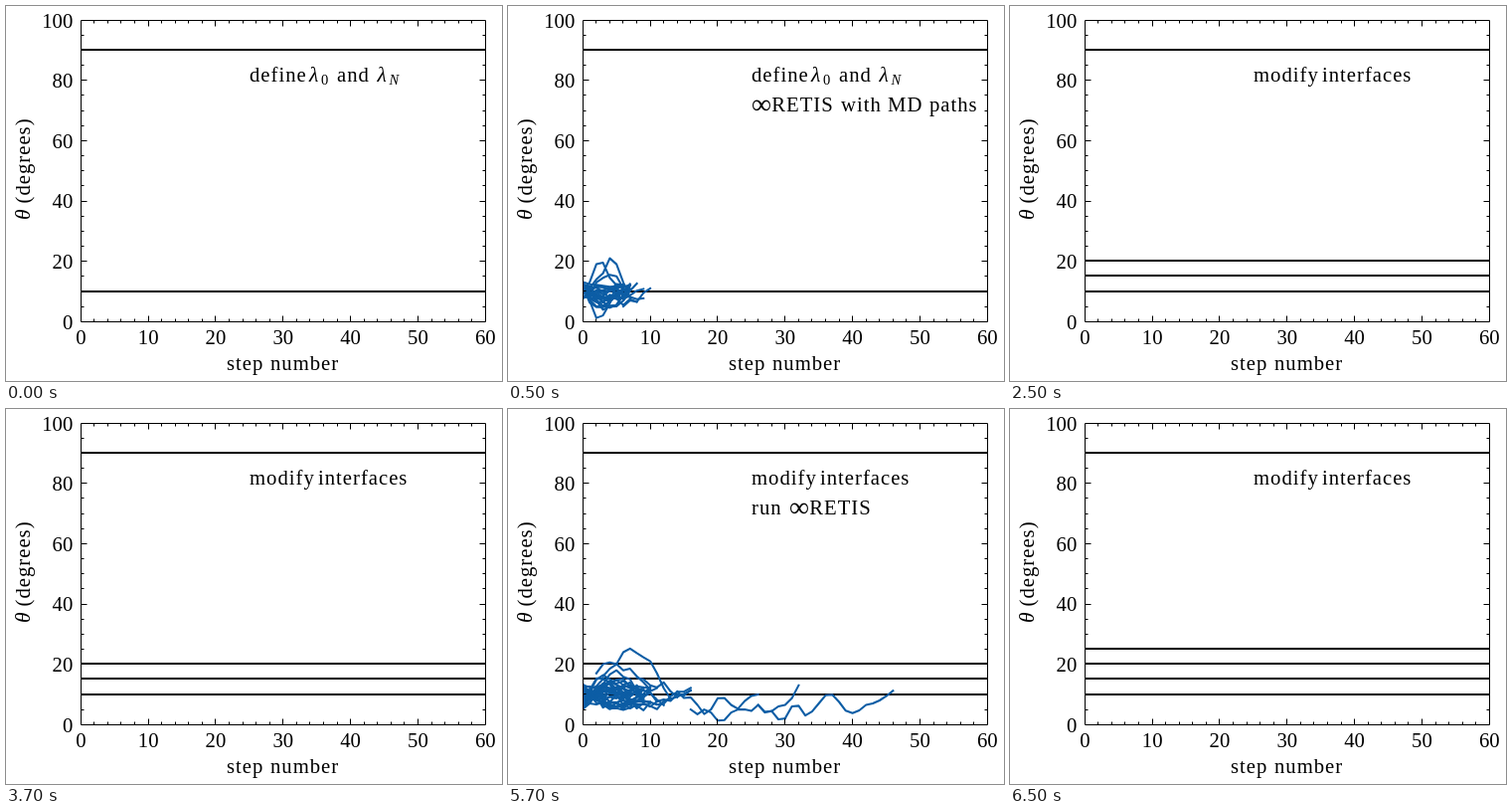
These frames come from a looping animation (499 by 377 pixels, 8000 ms). An HTML page:

```html
<!DOCTYPE html>
<html lang="en">
<head>
<meta charset="utf-8">
<title>Interface placement</title>
<style>
  html, body { margin: 0; width: 100%; height: 100%; overflow: hidden; background: #fff; }
  svg { display: block; width: 100%; height: 100%; }
  text { font: 20.7px "Liberation Serif", "Times New Roman", serif; fill: #000; }
  .word { letter-spacing: 1px; }
  .greek { font-style: italic; font-size: 21.5px; }
  .inf { font-size: 28px; }
  .sub { font-size: 14.5px; }
  .subItalic { font-size: 14.5px; font-style: italic; }
  .mid { text-anchor: middle; }
  .end { text-anchor: end; }
  .frame { fill: none; stroke: #000; stroke-width: 1; }
  .level { stroke: #000; stroke-width: 2; }
  .path { fill: none; stroke: #0c5da5; stroke-width: 2.08; stroke-linejoin: round; stroke-linecap: square; }
</style>
</head>
<body>
<svg viewBox="0 0 499 377">
  <defs><clipPath id="plot"><rect x="75" y="14" width="408" height="304"/></clipPath></defs>
  <g id="scenes"></g>
  <g id="axes"></g>
</svg>
<script>
const LOOP = 8000;
const px = step => 75.3 + step * 6.783;
const py = deg => 317.2 - deg * 3.03;

function add(parent, tag, attrs, text) {
  const node = document.createElementNS("http://www.w3.org/2000/svg", tag);
  for (const key in attrs) node.setAttribute(key, attrs[key]);
  if (text !== undefined) node.textContent = text;
  parent.appendChild(node);
  return node;
}

// items: [x, text, class, baseline shift]
function label(parent, y, items) {
  for (const [x, text, cls = "word", dy = 0] of items)
    add(parent, "text", { x, y: y + dy, class: cls }, text);
}

function random(seed) {
  return () => (seed = (seed * 16807) % 2147483647) / 2147483647;
}

function drawAxes(g) {
  let d = "M75.5 14.5H482.5V317.5H75.5Z";
  for (let s = 2; s < 60; s += 2) {
    const x = Math.floor(px(s)) + 0.5, len = s % 10 ? 3 : 6;
    d += `M${x} 14.5v${len}M${x} 317.5v${-len}`;
  }
  for (let v = 5; v < 100; v += 5) {
    const y = Math.floor(py(v)) + 0.5, len = v % 20 ? 3 : 6;
    d += `M75.5 ${y}h${len}M482.5 ${y}h${-len}`;
  }
  add(g, "path", { d, class: "frame" });
  for (let s = 0; s <= 60; s += 10) label(g, 340, [[px(s), s, "mid"]]);
  for (let v = 0; v <= 100; v += 20) label(g, py(v) + 7.3, [[67.3, v, "end"]]);
  label(g, 366, [[222, "step"], [266, "number"]]);
  const side = add(g, "g", { transform: "translate(24 215) rotate(-90)" });
  label(side, 0, [[0, "θ", "greek"], [16.6, "(degrees)"]]);
}

function drawPath(g, start, values) {
  const points = values.map((v, i) => `${px(start + i).toFixed(1)},${py(v).toFixed(1)}`).join(" ");
  add(g, "polyline", { points, class: "path" });
}

// Short excursions that leave and come back to the lowest level
function drawBundle(g, { seed, count, shortest, longest, low, high }) {
  const rnd = random(seed);
  for (let k = 0; k < count; k++) {
    const amp = low + (high - low) * rnd();
    const len = Math.round(shortest + (longest - shortest) * rnd());
    const rise = amp > 0;
    const first = rise ? 5 + 4.5 * rnd() : 10.5 + 3 * rnd();
    const last = rise ? 6 + 3.5 * rnd() : 10.5 + 2.5 * rnd();
    const values = [];
    for (let i = 0; i <= len; i++) {
      const u = i / len;
      const noise = i && i < len ? (rnd() - 0.5) * 3 : 0;
      values.push(Math.max(0.7, first + (last - first) * u + amp * Math.sin(Math.PI * u) + noise));
    }
    drawPath(g, 0, values);
  }
}

function mdPaths(g) {
  drawBundle(g, { seed: 4127, count: 20, shortest: 4, longest: 9, low: -8, high: 2 });
  drawPath(g, 0, [10, 13, 19, 19.5, 14.5, 12, 11, 8]);
  drawPath(g, 0, [9, 11, 14, 16, 21, 19, 13, 8]);
  drawPath(g, 1, [8, 13, 14.5, 15.5, 15, 11]);
  drawPath(g, 1, [7, 1.2, 2, 6]);
  drawPath(g, 6, [5, 7, 6.5, 9.5, 11]);
}

function retisPaths(g) {
  drawBundle(g, { seed: 9241, count: 26, shortest: 6, longest: 12, low: -7, high: 10 });
  drawBundle(g, { seed: 77, count: 3, shortest: 16, longest: 17, low: -6, high: -4 });
  drawPath(g, 3, [16, 18.5, 20, 24, 25.2, 23.7, 22.3, 21, 17, 12, 8.5]);
  drawPath(g, 2, [17, 20, 20.6, 20, 18, 18.5, 16, 14, 11.5]);
  drawPath(g, 8, [15.5, 15, 13, 12.3, 14, 11, 9]);
  drawPath(g, 14, [11, 8.8, 9, 6.5, 3.5, 5, 8.7, 8.8, 6.5, 5.2, 7.8, 9.5, 10]);
  drawPath(g, 26, [6.5, 4.2, 4.4, 6, 6.5, 8.7, 13]);
  drawPath(g, 16, [5, 3.4, 5, 4, 1.3, 1.5, 4, 5, 5, 4.5, 6.5, 4, 4.5, 1.7, 2]);
  drawPath(g, 30, [2, 6, 6.2, 3, 4.3, 7, 9.7, 9.9, 7.5, 4.6, 3.8, 4.7, 6.5, 7, 8, 9.4, 11.2]);
}

const retis = x => [[x, "∞", "inf", 2], [x + 20.3, "RETIS"]];
const define = [
  [245, "define"], [305, "λ", "greek"], [317, "0", "sub", 3],
  [333, "and"], [373.5, "λ", "greek"], [385.5, "N", "subItalic", 3]
];
const withPaths = [...retis(245), [335, "with"], [382, "MD"], [424, "paths"]];
const modify = [[245, "modify"], [314, "interfaces"]];
const run = [[245, "run"], ...retis(283)];

const scenes = [
  { at: 0, levels: [10, 90], lines: [define] },
  { at: 500, levels: [10, 90], lines: [define, withPaths], paths: mdPaths },
  { at: 2500, levels: [10, 15, 20, 90], lines: [modify] },
  { at: 4500, levels: [10, 15, 20, 90], lines: [modify, run], paths: retisPaths },
  { at: 6500, levels: [10, 15, 20, 25, 90], lines: [modify] }
];

const root = document.getElementById("scenes");
for (const scene of scenes) {
  scene.node = add(root, "g", {});
  const plot = add(scene.node, "g", { "clip-path": "url(#plot)" });
  for (const v of scene.levels) {
    const y = Math.round(316.9 - v * 3.03);
    add(plot, "line", { x1: 75, x2: 483, y1: y, y2: y, class: "level" });
  }
  if (scene.paths) scene.paths(plot);
  scene.lines.forEach((items, i) => label(scene.node, 75.5 + i * 30.4, items));
}
drawAxes(document.getElementById("axes"));

function draw(time) {
  const t = time % LOOP;
  const current = scenes.filter(s => s.at <= t).pop();
  for (const s of scenes) s.node.setAttribute("display", s === current ? "inline" : "none");
}

const begin = performance.now();
function tick() {
  draw(performance.now() - begin);
  requestAnimationFrame(tick);
}
tick();
</script>
</body>
</html>
```
